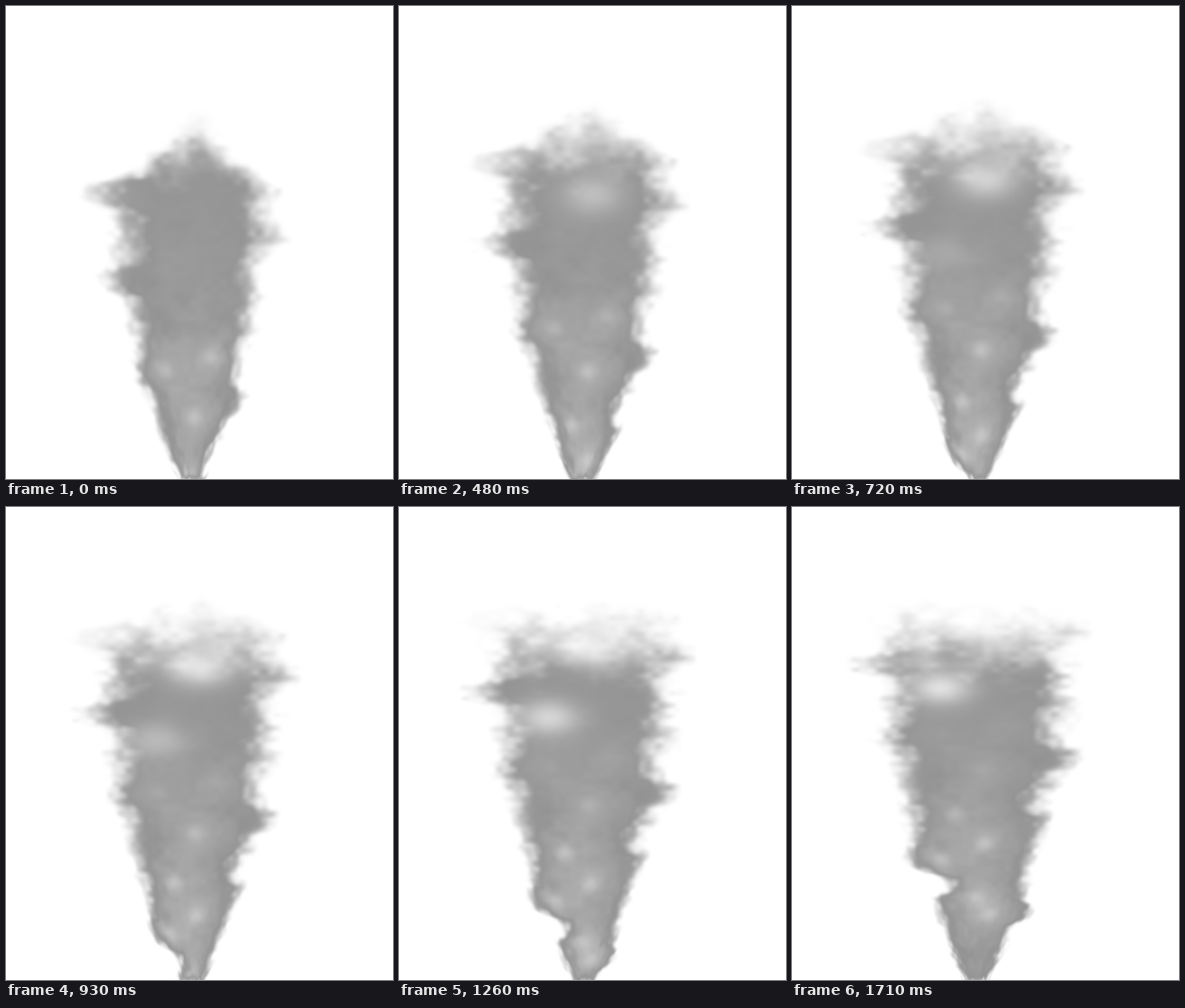
Animation of 600 by 734 pixels, one loop 1.74 s. Source, as an HTML page with a canvas:

```html
<!DOCTYPE html>
<html lang="en">
<head>
<meta charset="utf-8">
<title>Rising smoke</title>
<style>
html, body { margin: 0; width: 100%; height: 100%; overflow: hidden; background: #fff; }
canvas { display: block; width: 600px; height: 734px; }
</style>
</head>
<body>
<canvas id="stage" width="300" height="367"></canvas>
<script>
const LOOP = 1740, STEP = 30, CELL = 2, AXIS = 287, FLOOR = 734;
const W = 300, H = 367, LEFT = 40, RIGHT = 248, TOP = 45;
const ctx = document.getElementById('stage').getContext('2d');
const image = ctx.createImageData(W, H);
image.data.fill(255);

// Features ride on the gas; `at` is the height they have at time 0.
// Heights beyond the floor leave the vent later.
const bulges = [
  { at: 290, side: -1, size: .3 }, { at: 428, side: -1, size: .25 },
  { at: 570, side: -1, size: .12 }, { at: 815, side: -1, size: .2 },
  { at: 870, side: -1, size: -.32 }, { at: 355, side: 1, size: .13 },
  { at: 615, side: 1, size: .2 }, { at: 700, side: 1, size: -.1 },
  { at: 925, side: 1, size: .33 }
];
const lights = [
  { at: 543, u: .32 }, { at: 565, u: -.45 }, { at: 640, u: .05 },
  { at: 730, u: -.3 }, { at: 787, u: .12 }, { at: 820, u: -.6 },
  { at: 894, u: 0 }, { at: 930, u: .28 }
];
const gaps = [
  { at: 343, u: .1, from: 0 }, { at: 290, u: -1.1, from: -.3 }, { at: 475, u: -.42, from: .5 }
];

const clamp = v => Math.min(1, Math.max(0, v));
const smooth = v => { v = clamp(v); return v * v * (3 - 2 * v); };
const bell = d2 => Math.exp(-d2);

let seed = 7;
const random = () => (seed = (seed * 16807) % 2147483647) / 2147483647;
const lattice = Float32Array.from({ length: 4096 }, () => random() * 2 - 1);

function noise(x, y) {
  const ix = Math.floor(x), iy = Math.floor(y);
  const fx = smooth(x - ix), fy = smooth(y - iy);
  const at = (i, j) => lattice[(ix + i & 63) + (iy + j & 63) * 64];
  const a = at(0, 0), b = at(0, 1);
  return (a + (at(1, 0) - a) * fx) * (1 - fy) + (b + (at(1, 1) - b) * fx) * fy;
}

function reach(s, side) {
  let r = .76;
  for (const b of bulges) {
    if (b.side === side) r += b.size * bell(((s - b.at) / 22) ** 4);
  }
  return r * smooth((s - 185) / 110);
}

function drawRow(row, t) {
  const y = row * CELL + 1, up = FLOOR - y;
  const s = (y + 383) * Math.exp(.15 * t) - 383;
  const age = Math.min(t, Math.log((FLOOR + 383) / (y + 383)) / .15);
  const spread = 22 + 130 * (1 - Math.exp(-up / 220));
  const grown = spread * (1 + .1 * age);
  const l = reach(s, -1) * grown, r = reach(s, 1) * grown;
  const soft = 6 + Math.min(30, 25 * (up / 334) ** 1.5);
  const rough = 3 + soft * .45;
  const glow = clamp((y - 225) / 300);
  const puffs = lights.filter(p => Math.abs(s - p.at) < 100);

  for (let col = LEFT; col < RIGHT; col++) {
    const dx = col * CELL + 1 - AXIS, u = dx / spread;
    let edge = Math.min(l + dx, r - dx, (up + 1) * 1.3);
    let value = 255;
    if (edge > -soft - rough * 1.2) {
      const mx = u * 110 + 900;
      const big = noise(mx / 24, s / 24);
      const fine = noise(mx / 11 + 20, s / 11 + 11);
      edge += rough * (big * .6 + fine * .5);
      let alpha = smooth((edge + soft) / (2 * soft));
      alpha *= smooth((y - 152 + big * 20 + fine * 10) / 136);
      for (const g of gaps) {
        const depth = Math.min(.7, Math.max(0, t - g.from) * .8);
        alpha *= 1 - depth * bell(((s - g.at) / 33) ** 2 + ((u - g.u) / .35) ** 2);
      }
      let light = 8 * bell((u / .6) ** 2) + 5 * big + 3 * fine;
      for (const p of puffs) {
        const d2 = (s - p.at) ** 2 + ((u - p.u) * spread) ** 2;
        light += 15 * bell(d2 / 42 ** 2) + 20 * glow ** 2 * bell(d2 / 14 ** 2);
      }
      const inside = smooth(edge / (14 + spread * .2));
      const shade = Math.min(225, 148 + light * glow * inside);
      value = 255 - alpha * (255 - shade);
    }
    const i = (row * W + col) * 4;
    image.data[i] = image.data[i + 1] = image.data[i + 2] = value;
  }
}

let shown = -1;
const start = performance.now();
function draw(now) {
  const step = Math.floor((Math.max(0, now - start) % LOOP) / STEP);
  if (step !== shown) {
    shown = step;
    for (let row = TOP; row < H; row++) drawRow(row, step * STEP / 1000);
    ctx.putImageData(image, 0, 0);
  }
  requestAnimationFrame(draw);
}
draw(start);
</script>
</body>
</html>
```
